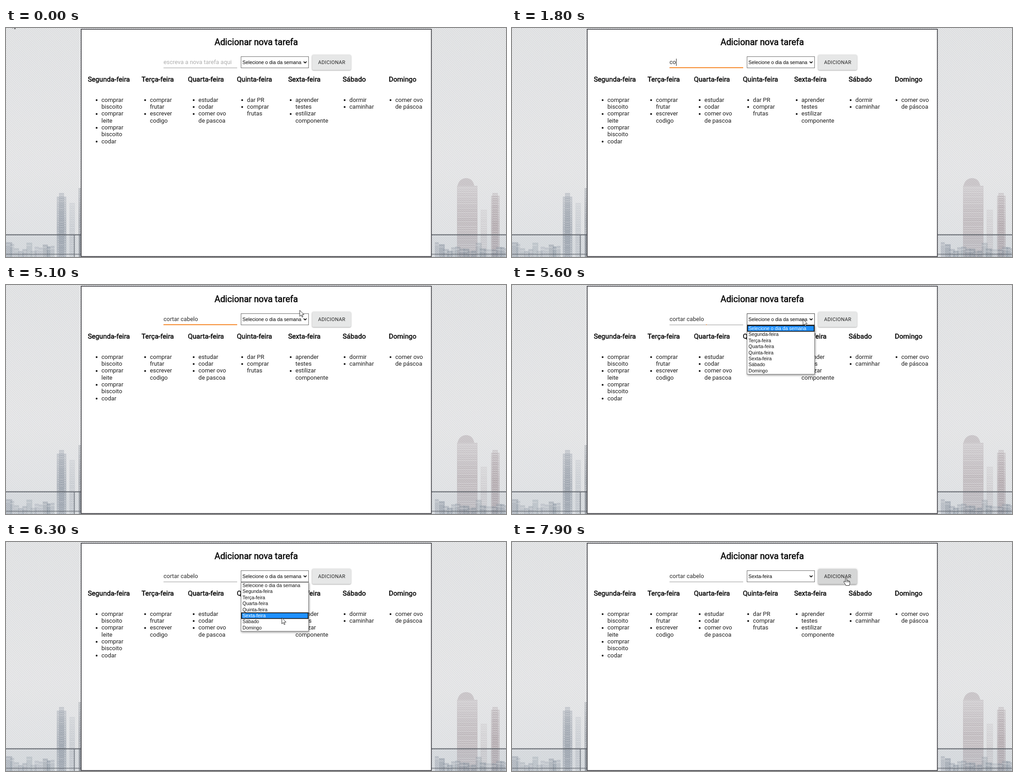
Animation, 1103 px wide and 508 px high, one loop 8 s. Source, as an HTML page with a canvas:

```html
<!DOCTYPE html>
<html lang="pt-BR">
<head>
<meta charset="utf-8">
<title>Adicionar nova tarefa</title>
<style>
  html, body { margin: 0; width: 100%; height: 100%; overflow: hidden; background: #eee; }
  canvas, svg { position: absolute; left: 0; top: 0; width: 1103px; height: 508px; }
  text { font: 12.93px Roboto, sans-serif; white-space: pre; fill: #1c1c1c; }
  .bold { fill: #0c0c0c; stroke: #0c0c0c; stroke-width: .55px; font-size: 15.1px; }
  #title { font-size: 19.4px; stroke-width: .65px; text-anchor: middle; }
  #hint { fill: #adadad; }
  #typed { fill: #2b2b2b; }
  #caption { font-size: 11.1px; letter-spacing: .3px; fill: #222; }
  #choice { font: 10.77px "Liberation Sans", Arial, sans-serif; fill: #000; }
  #popup text { font: 10.55px "Liberation Sans", Arial, sans-serif; fill: #111; }
  #popup text.on { fill: #fff; }
  #list { fill: #fff; stroke: #767676; filter: drop-shadow(1px 2px 2px rgba(0,0,0,.4)); }
  #button { fill: #e6e7e7; filter: drop-shadow(0 1.6px 1px rgba(0,0,0,.28)) drop-shadow(0 .6px 1.2px rgba(0,0,0,.15)); }
  #button.hover { fill: #d5d6d6; filter: drop-shadow(0 2px 1.5px rgba(0,0,0,.32)) drop-shadow(0 .8px 2px rgba(0,0,0,.15)); }
  #select { fill: #fff; stroke: #6a6a6a; }
  #select.hover { stroke: #444; }
  #pointer path { fill: #fff; stroke: #111; stroke-width: .9px; stroke-linejoin: round; }
  #pointer #beam { fill: none; stroke: #222; }
</style>
</head>
<body>
<canvas id="scene" width="1103" height="508"></canvas>
<svg id="app" width="1103" height="508">
  <rect x="165.8" y="2.7" width="772.6" height="504.2" fill="#fff" stroke="#34343a" stroke-width="1.6"/>
  <text id="title" class="bold" x="552" y="38">Adicionar nova tarefa</text>
  <rect x="347.5" y="88" width="162.5" height=".9" fill="#8c8c8c"/>
  <rect id="underline" y="87.2" height="1.8" fill="#f57c14"/>
  <text id="hint" x="347.5" y="80.2">escreva a nova tarefa aqui</text>
  <text id="typed" x="347.5" y="80.2"></text>
  <rect id="caret" y="68" width="1" height="16" fill="#222"/>
  <rect id="select" x="518.5" y="63.5" width="149" height="25"/>
  <text id="choice" x="521.6" y="79.6"></text>
  <path d="M656.7 74.3l3.1 3.2 3.1-3.2" fill="none" stroke="#000" stroke-width="1.7"/>
  <rect id="button" x="675.2" y="59.5" width="85.8" height="33.8" rx="3.2"/>
  <text id="caption" x="688.5" y="79.8">ADICIONAR</text>
  <g id="days"></g>
  <g id="popup">
    <rect id="list" x="518.5" y="89.5" width="149" height="108.5"/>
    <rect id="mark" x="519.5" width="147" height="12.6" fill="#1e90ff" stroke="#101010" stroke-width="1.7"/>
  </g>
  <g id="pointer">
    <path id="arrow" d="M0 0v13.5l3.1-2.9 2 4.7 2-.9-2-4.5h4.3z"/>
    <path id="beam" d="M-2.5-7.5h5M0-7.5v15M-2.5 7.5h5"/>
    <path id="hand" d="M-1.5.8Q0-1.2 1.4.8V5.5Q2.9 4.4 4 6 5.6 5 6.4 6.8 8.2 6.2 8.2 8.2v3.3q0 2-1.2 5H-.5q-1-3-4.3-7.3Q-5.8 7.5-4.2 7-2.8 7-1.5 9zM1.4 5.5v4M4 6v3.5M6.4 6.8v2.7"/>
  </g>
</svg>
<script>
const LOOP = 8000, ROW = 13.4, LINE = 15.35, MENU_TOP = 89.5;
const $ = id => document.getElementById(id);
const show = (node, on) => node.setAttribute('visibility', on ? 'inherit' : 'hidden');

function add(parent, tag, attrs, text = '') {
  const node = document.createElementNS('http://www.w3.org/2000/svg', tag);
  for (const key in attrs) node.setAttribute(key, attrs[key]);
  node.textContent = text;
  parent.append(node);
  return node;
}

// Each task is a list of wrapped lines separated by "/".
const columns = [
  ['Segunda-feira', 180.4, 210.5, ['comprar/biscoito', 'comprar/leite', 'comprar/biscoito', 'codar']],
  ['Terça-feira', 299, 317.5, ['comprar/frutar', 'escrever/codigo']],
  ['Quarta-feira', 401.3, 424.6, ['estudar', 'codar', 'comer ovo/de pascoa']],
  ['Quinta-feira', 509.2, 531.6, ['dar PR', 'comprar/frutas']],
  ['Sexta-feira', 622.4, 638.6, ['aprender/testes', 'estilizar/componente']],
  ['Sábado', 742.8, 757.6, ['dormir', 'caminhar']],
  ['Domingo', 844.6, 858.8, ['comer ovo/de páscoa']]
];
for (const [day, headX, x, tasks] of columns) {
  add($('days'), 'text', { class: 'bold', x: headX, y: 119.2 }, day);
  let y = 163.6;
  for (const task of tasks) {
    add($('days'), 'circle', { cx: x - 10.6, cy: y - 3.6, r: 2, fill: '#111' });
    for (const line of task.split('/')) {
      add($('days'), 'text', { x, y }, line);
      y += LINE;
    }
  }
}
const PROMPT = 'Selecione o dia da semana';
const options = [PROMPT, ...columns.map(c => c[0])].map((label, i) =>
  add($('popup'), 'text', { x: 521.8, y: 100 + i * ROW }, label));

const ctx = $('scene').getContext('2d');

function tower(x, y, w, color, rng) {
  const fade = ctx.createLinearGradient(0, y, 0, 508);
  fade.addColorStop(0, `rgba(${color},.35)`);
  fade.addColorStop(.5, `rgba(${color},.6)`);
  fade.addColorStop(1, `rgba(${color},.5)`);
  ctx.fillStyle = fade;
  ctx.fillRect(x, y, w, 508 - y);
  for (let row = y + 4; row < 508; row += 5) {
    ctx.fillStyle = `rgba(255,255,255,${.15 + rng() * .3})`;
    ctx.fillRect(x + 1, row, w - 2, 1.5);
  }
}

function paintScene() {
  let seed = 7;
  const rng = () => (seed = seed * 16807 % 2147483647) / 2147483647;
  const sky = ctx.createLinearGradient(0, 0, 0, 508);
  sky.addColorStop(0, '#eeeff0');
  sky.addColorStop(.6, '#f3f3f4');
  sky.addColorStop(1, '#eceef0');
  ctx.fillStyle = sky;
  ctx.fillRect(0, 0, 1103, 508);

  const blue = '136,146,160', rose = '172,158,163';
  tower(112, 374, 21, blue, rng);
  tower(117, 366, 11, blue, rng);
  tower(140, 388, 12, '190,196,204', rng);
  tower(160, 355, 5, '120,126,136', rng);
  tower(995, 350, 45, rose, rng);
  ctx.fillStyle = 'rgba(172,158,163,.45)';
  ctx.beginPath();
  ctx.moveTo(996, 350);
  ctx.quadraticCurveTo(1000, 333, 1016, 333);
  ctx.quadraticCurveTo(1030, 334, 1033, 350);
  ctx.fill();
  tower(1070, 372, 19, rose, rng);
  tower(1073, 366, 12, rose, rng);
  tower(1047, 403, 14, '205,200,203', rng);

  // low roofs behind the railing
  for (const [from, to] of [[0, 106], [946, 1103]]) {
    for (let x = from; x < to; x += 9) {
      const top = 475 + rng() * 20;
      ctx.fillStyle = `rgba(125,137,151,${.2 + rng() * .35})`;
      ctx.fillRect(x, top, 8 + rng() * 6, 508 - top);
      ctx.fillStyle = 'rgba(255,255,255,.4)';
      ctx.fillRect(x, top + 5, 10, 2);
    }
  }
  ctx.fillStyle = 'rgba(120,135,155,.1)';
  ctx.fillRect(0, 460, 1103, 48);

  const tile = document.createElement('canvas');
  tile.width = tile.height = 4;
  const pen = tile.getContext('2d');
  const shades = ['rgba(85,90,96,.3)', 'rgba(95,100,105,.1)', 'rgba(255,255,255,.45)'];
  for (let y = 0; y < 4; y++) shades.forEach((shade, i) => {
    pen.fillStyle = shade;
    pen.fillRect((y + i) % 4, y, 1, 1);
  });
  ctx.fillStyle = ctx.createPattern(tile, 'repeat');
  ctx.fillRect(0, 0, 1103, 508);

  ctx.fillStyle = 'rgba(90,95,103,.8)';
  ctx.fillRect(0, 457.5, 1103, 2.5);
  ctx.fillRect(0, 501, 1103, 1.5);
  ctx.fillStyle = 'rgba(110,115,123,.65)';
  ctx.fillRect(149.5, 459, 2.5, 49);
  ctx.fillRect(162, 459, 2, 49);
}
paintScene();

const TEXT = 'cortar cabelo';
const keyTimes = [1700, 1800, 2000, 2100, 2300, 2400, 3100, 3400, 3600, 3800, 4000, 4200, 4400];
const FOCUS = 950, BLUR = 5440, OPEN = 5500, PICK = 7100;

// time, x, y of the pointer's hot spot
const path = [
  [0, 14, -13], [100, 14, -13], [800, 430, 76], [4800, 430, 76], [5000, 610, 60],
  [5100, 648, 56], [5200, 648, 62], [5400, 642, 76], [5900, 642, 76], [6300, 608.5, 168],
  [7000, 608.5, 168], [7700, 652, 76], [7800, 652, 76], [7900, 737, 80], [LOOP, 737, 80]
];

function pointerAt(t) {
  const i = path.findIndex(key => key[0] > t);
  const [t0, x0, y0] = path[i - 1], [t1, x1, y1] = path[i];
  const p = (t - t0) / (t1 - t0);
  return [x0 + (x1 - x0) * p, y0 + (y1 - y0) * p];
}

const easeOut = p => 1 - (1 - Math.min(1, Math.max(0, p))) ** 3;
const inside = (x, y, left, top, right, bottom) => x >= left && x < right && y >= top && y < bottom;

function render(now) {
  const t = Math.floor(now % LOOP / 100) * 100;
  const [x, y] = pointerAt(t);
  const menuOpen = t >= OPEN && t < PICK;

  const count = keyTimes.filter(time => time <= t).length;
  const typed = TEXT.slice(0, count);
  $('typed').textContent = typed;
  show($('hint'), !count);
  ctx.font = '12.93px Roboto, sans-serif';
  $('caret').setAttribute('x', Math.round(347.5 + ctx.measureText(typed).width));
  const lastKey = count ? keyTimes[count - 1] : 1000;
  show($('caret'), t >= 1000 && t < BLUR && (t - lastKey) % 1000 < 500);

  const spread = 162.5 * (easeOut((t - FOCUS) / 200) - easeOut((t - BLUR) / 200));
  $('underline').setAttribute('x', 428.75 - spread / 2);
  $('underline').setAttribute('width', spread);

  show($('popup'), menuOpen);
  const row = Math.max(0, Math.min(7, Math.floor((y - MENU_TOP) / ROW)));
  $('mark').setAttribute('y', MENU_TOP + .6 + row * ROW);
  options.forEach((option, i) => option.classList.toggle('on', i === row));
  $('choice').textContent = t < PICK ? PROMPT : 'Sexta-feira';

  const onButton = inside(x, y, 675, 59, 761, 94);
  const onInput = inside(x, y, 348, 63, 510, 89);
  $('button').classList.toggle('hover', onButton);
  $('select').classList.toggle('hover', inside(x, y, 518, 63, 668, 89));
  $('pointer').setAttribute('transform', `translate(${x} ${y})`);
  show($('pointer'), t < 1700 || t >= 4900);
  show($('hand'), onButton);
  show($('beam'), onInput);
  show($('arrow'), !onButton && !onInput);
}

function tick() {
  render(performance.now());
  requestAnimationFrame(tick);
}
tick();
</script>
</body>
</html>
```
